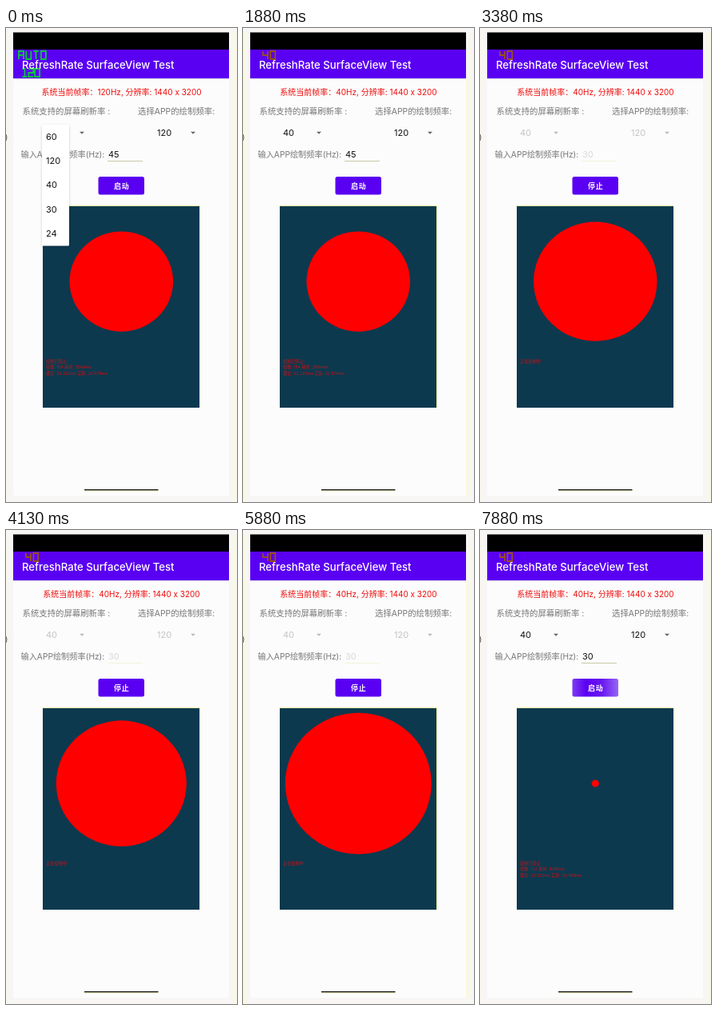
Recreate the animation shown at these times as an HTML page. Size 289 by 593 pixels, loop 8000 ms.

```html
<!DOCTYPE html>
<html lang="zh">
<head>
<meta charset="utf-8">
<title>RefreshRate SurfaceView Test</title>
<style>
  html, body { margin: 0; width: 100%; height: 100%; overflow: hidden; background: #fcfcfc; }
  svg { display: block; width: 289px; height: 593px; }
  text { font-family: Inter, "Noto Sans CJK SC", "Noto Sans CJK", sans-serif; white-space: pre; }
  .label { font-size: 10.4px; fill: #777; }
  .value { font-size: 11px; fill: #111; }
  .off .value { fill: #c4c4c4; }
  .off .arrow { fill: #bbb; }
  .off #input { fill: #d9d9d9; }
  .arrow { fill: #666; }
  .log { font-size: 5.2px; fill: #d80c10; }
  .hud { fill: none; stroke-width: 1.8; }
</style>
</head>
<body>
<svg viewBox="0 0 289 593">
  <defs>
    <linearGradient id="ripple">
      <stop offset="0" stop-color="#7d3cf2"/>
      <stop offset=".3" stop-color="#5a00f2"/>
      <stop offset=".65" stop-color="#6a18f2"/>
      <stop offset="1" stop-color="#9467f4"/>
    </linearGradient>
    <linearGradient id="barShade" x2="0" y2="1">
      <stop offset="0" stop-color="#d8d6de"/>
      <stop offset="1" stop-color="#fcfcfc"/>
    </linearGradient>
    <filter id="shadow" x="-30%" y="-10%" width="160%" height="120%">
      <feDropShadow dx="0" dy="1" stdDeviation="1.5" flood-opacity=".2"/>
    </filter>
  </defs>

  <rect width="289" height="593" fill="#f7f6f4"/>
  <rect x="9" y="5.5" width="270" height="580" fill="#fcfcfc"/>
  <path d="M1.5 5V593M279.5 63V585M285.5 5V593" stroke="#fbfbd0"/>
  <path d="M0 133q2 4 0 8" fill="none" stroke="#555"/>
  <rect x="9" y="5.5" width="270" height="22"/>
  <rect x="9" y="27" width="270" height="36" fill="#5a00f2"/>
  <rect x="9" y="63" width="270" height="2" fill="url(#barShade)"/>
  <path id="hudTop" class="hud"/>
  <path id="hudLow" class="hud"/>
  <text x="20" y="51" font-size="13.2" font-weight="500" fill="#fff">RefreshRate SurfaceView Test</text>

  <text id="rate" x="144.5" y="83.5" font-size="10" fill="#f00a0a" text-anchor="middle"></text>
  <text class="label" x="20.5" y="107.8">系统支持的屏幕刷新率 :</text>
  <text class="label" x="165" y="107.8">选择APP的绘制频率:</text>
  <text class="label" x="18.5" y="161.5" style="font-size:10.2px">输入APP绘制频率(Hz):</text>

  <g id="form">
    <text id="screen" class="value" x="50" y="135"></text>
    <path class="arrow" d="M92 129.8h6l-3 3z"/>
    <text class="value" x="189" y="135">120</text>
    <path class="arrow" d="M231 129.8h6l-3 3z"/>
    <text id="input" class="value" x="128" y="162"></text>
    <path id="line" d="M127 166.5H171"/>
  </g>

  <rect id="button" x="115.5" y="186" width="57.5" height="22.5" rx="2.5"/>
  <text id="action" x="144.8" y="200.5" font-size="9" font-weight="600" letter-spacing=".9" fill="#fff" text-anchor="middle"></text>

  <rect x="46" y="222.5" width="196" height="252.5" fill="#0c394e"/>
  <path d="M46 222.3H242.5V475" fill="none" stroke="#f8f8a4"/>
  <ellipse id="ball" cx="144.3" cy="317.1" fill="#f00"/>
  <text class="log" x="50" y="418.8"></text>
  <text class="log" x="50" y="426.3"></text>
  <text class="log" x="50" y="433.6"></text>

  <g id="menu">
    <rect x="45" y="121" width="34" height="151.5" rx="1.5" fill="#fff" filter="url(#shadow)"/>
  </g>
  <path d="M98 579H190.5" stroke="#f4f4a8"/>
  <path d="M98 577.8H190.5" stroke="#222" stroke-width="1.4"/>
</svg>
<script>
  const LOOP = 8000, STEP = 125;
  const $ = id => document.getElementById(id);
  const logs = [...document.querySelectorAll('.log')];

  ['60', '120', '40', '30', '24'].forEach((label, i) => {
    const item = document.createElementNS('http://www.w3.org/2000/svg', 'text');
    item.setAttribute('class', 'value');
    item.setAttribute('x', 50);
    item.setAttribute('y', 139.5 + i * 30.4);
    item.textContent = label;
    $('menu').append(item);
  });

  // Block glyphs in a 6 x 10 box
  const GLYPHS = {
    A: 'v-10h6v10m0-5h-6', U: 'm0-10v10h6v-10', T: 'm0-10h6m-3 0v10',
    O: 'v-10h6v10z', 0: 'v-10h6v10z', 1: 'm0-10h3v10m-3 0h6',
    2: 'm0-10h6v5h-6v5h6', 4: 'm0-10v5h6m0-5v10', 8: 'v-10h6v10zm0-5h6'
  };
  const blocks = (word, x, y, pitch) =>
    [...word].map((c, i) => `M${x + i * pitch} ${y}${GLYPHS[c]}`).join('');

  const GREEN = '#08c83c', RED = '#c81c28', BROWN = '#96501c';
  const HUD = [
    [0, 'AUTO', 16, '120', 20.5, GREEN],
    [1125, 'AUTO', 16, '8', 34.5, RED],
    [1375, '40', 25, '', 0, BROWN]
  ];
  const PICK = 1000, SWITCHED = 1375, TYPED = 3000, START = 3250, STOP = 7750;
  const FIRST = ['绘制已停止:', '帧数: 154 耗时: 3564ms', '理论: 22.222ms 实际: 22.674ms'];
  const SECOND = ['绘制已停止:', '帧数: 132 耗时: 4418ms', '理论: 33.333ms 实际: 33.469ms'];
  const BUSY = ['正在绘制中', '', ''];

  // Grows steadily, then starts over from the centre
  function radius(t) {
    if (t < START) return 64.8;
    return (81.5 + (t - 4125) * 0.0057) % 98.2;
  }

  function render(time) {
    const t = Math.floor(time % LOOP / STEP) * STEP;
    const busy = t >= START && t < STOP;

    const [, top, topX, low, lowX, tint] = HUD.filter(h => h[0] <= t).pop();
    $('hudTop').setAttribute('d', blocks(top, topX, 39, 9.3));
    $('hudLow').setAttribute('d', blocks(low, lowX, 61, 7.8));
    $('hudTop').setAttribute('stroke', top === 'AUTO' ? GREEN : tint);
    $('hudLow').setAttribute('stroke', tint);

    $('rate').textContent = `系统当前帧率：${t < SWITCHED ? 120 : 40}Hz, 分辨率: 1440 x 3200`;
    $('screen').textContent = t < PICK ? '120' : '40';
    $('input').textContent = t < TYPED ? '45' : '30';
    $('form').setAttribute('class', busy ? 'off' : '');
    $('line').setAttribute('stroke', busy ? '#f4f4dc' : '#c9c9a8');

    const pressed = t === START || t >= STOP;
    $('button').setAttribute('fill', pressed ? 'url(#ripple)' : '#5a00f2');
    $('action').textContent = busy ? '停止' : '启动';

    const r = radius(t);
    $('ball').setAttribute('rx', r);
    $('ball').setAttribute('ry', r * 0.966);
    const lines = busy ? BUSY : t < START ? FIRST : SECOND;
    logs.forEach((log, i) => log.textContent = lines[i]);

    $('menu').setAttribute('opacity', t <= PICK ? 1 : t < 1250 ? 0.38 : 0);
  }

  const began = performance.now();
  function tick() {
    render(performance.now() - began);
    requestAnimationFrame(tick);
  }
  tick();
</script>
</body>
</html>
```
